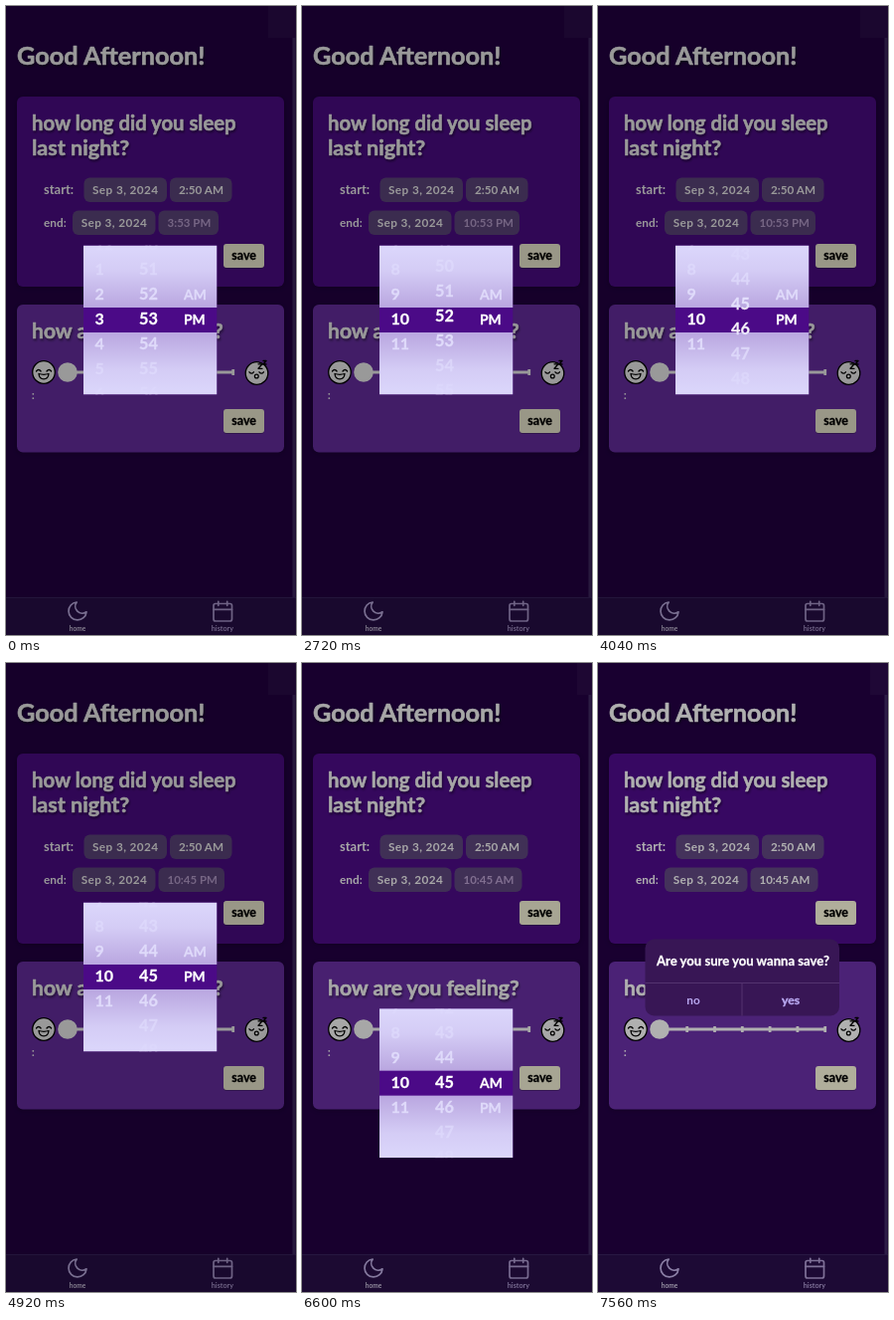
Write an HTML page that moves like this. It is 292 px wide and 632 px high and loops after 8 s.

```html
<!DOCTYPE html>
<html lang="en">
<head>
<meta charset="utf-8">
<title>Sleep log</title>
<style>
html, body { margin: 0; width: 100%; height: 100%; overflow: hidden; background: #240046; }
svg { display: block; width: 292px; height: 632px; }
text { font-family: Lato, "Open Sans", sans-serif; font-weight: 700; fill: #fff; }
.head { stroke: #fff; stroke-width: .6; stroke-linejoin: round; filter: drop-shadow(1px 2px 1px rgba(0,0,0,.45)); }
.date { font-size: 11.8px; letter-spacing: .4px; }
.ink { fill: #000; stroke: #000; stroke-width: .3; }
.wheel text { stroke: #fff; stroke-width: .3; stroke-linejoin: round; }
.line { fill: none; stroke-linecap: round; stroke-linejoin: round; }
.pill { fill: #624983; }
.card { filter: drop-shadow(0 1px 2px rgba(0,0,0,.25)); }
.choice { fill: #b9a8f0; }
</style>
</head>
<body>
<svg viewBox="0 0 292 632" xmlns="http://www.w3.org/2000/svg">
  <defs>
    <linearGradient id="fadeTop" x1="0" y1="0" x2="0" y2="1">
      <stop offset="0" stop-color="#e0ddff" stop-opacity=".97"/>
      <stop offset=".4" stop-color="#e0ddff" stop-opacity=".92"/>
      <stop offset="1" stop-color="#e0ddff" stop-opacity=".74"/>
    </linearGradient>
    <linearGradient id="fadeBottom" x1="0" y1="1" x2="0" y2="0" href="#fadeTop"/>
    <clipPath id="window"><rect x="78" y="240.5" width="134.5" height="150"/></clipPath>
  </defs>

  <rect width="292" height="632" fill="#240046"/>
  <rect id="corner" y="0" width="30" height="32" fill="#fff" opacity=".045"/>
  <rect x="288.5" y="32" width="3" height="562" fill="#432a66"/>

  <text class="head" x="11" y="59" font-size="25.3">Good Afternoon!</text>

  <rect class="card" x="11" y="91" width="269" height="191" rx="6" fill="#500c8e"/>
  <text class="head" x="26" y="125" font-size="20.3">how long did you sleep</text>
  <text class="head" x="26" y="150" font-size="21.6">last night?</text>
  <text x="38" y="188.5" font-size="13">start:</text>
  <rect class="pill" x="78.5" y="172.5" width="83.5" height="24.5" rx="6"/>
  <text class="date" x="87" y="188.8">Sep 3, 2024</text>
  <rect class="pill" x="165" y="172.5" width="62.5" height="24.5" rx="6"/>
  <text x="174" y="188.8" font-size="11.7">2:50 AM</text>
  <text x="38" y="221.5" font-size="11.8">end:</text>
  <rect class="pill" x="67" y="205.5" width="83.5" height="24.5" rx="6"/>
  <text class="date" x="75.7" y="221.8">Sep 3, 2024</text>
  <rect class="pill" id="endPill" x="153.5" y="205.5" height="24.5" rx="6"/>
  <text id="endTime" x="162.5" y="221.8" font-size="11.5"></text>

  <rect class="card" x="11" y="300" width="269" height="148.5" rx="6" fill="#6d31ab"/>
  <text class="head" x="26" y="334" font-size="21.1">how are you feeling?</text>
  <g id="slider" fill="#fff"><rect x="62" y="366.5" width="168" height="3"/></g>
  <circle cx="62" cy="368" r="9.8" fill="#fff"/>
  <g class="line" stroke="#000" stroke-width="1.3">
    <circle cx="38" cy="368" r="11.3" fill="#fff"/>
    <path d="M30.5 367q2.3-3 4.600 0M41 367q2.300-3 4.600 0"/>
    <path d="M33 369.500q5 1.600 10 0q-.500 5.300-5 5.300t-5-5.300z"/>
    <circle cx="252.500" cy="369" r="11.300" fill="#fff"/>
    <path d="M245 367.800q2.200 2.600 4.400 0M255 367.800q2.200 2.600 4.400 0"/>
    <circle cx="252.300" cy="372" r="1.900"/>
    <path d="M254 359.800h4l-4 4.500h4M259 356.500h3l-3 3.500h3"/>
  </g>
  <text x="25.800" y="395" font-size="12" font-weight="400">:</text>
  <g id="saves"></g>

  <rect y="594" width="292" height="38" fill="#2a0f4c"/>
  <rect y="594" width="292" height="1" fill="#3a2360"/>
  <g class="line" stroke="#b7a3dc" stroke-width="1.700">
    <path stroke="#c9b8f0" transform="translate(60 596)" d="M21 12.800A9 9 0 1 1 11.200 3a7 7 0 0 0 9.800 9.800z"/>
    <rect x="209" y="600.500" width="18.500" height="17.500" rx="2"/>
    <path d="M209 606.300h18.500M213.800 598.300v4M222.700 598.300v4"/>
  </g>
  <text x="63.800" y="628" font-size="6.600" style="fill:#ddd4ee">home</text>
  <text x="206.800" y="628" font-size="7.200" style="fill:#b7a3dc">history</text>

  <rect id="shade" width="292" height="632"/>

  <g id="picker">
    <g clip-path="url(#window)">
      <rect x="78" y="240.500" width="134.500" height="150" fill="#4b0a87"/>
      <g class="wheel" id="wheels"></g>
      <rect x="78" y="240.500" width="134.500" height="62.500" fill="url(#fadeTop)"/>
      <rect x="78" y="328" width="134.500" height="62.500" fill="url(#fadeBottom)"/>
    </g>
  </g>

  <g id="alert">
    <rect x="47.500" y="277.500" width="195.500" height="77" rx="9" fill="#381655"/>
    <path d="M47.500 321.500h195.500M145 321.500v33" stroke="#543370" stroke-width="1"/>
    <text x="59" y="303.500" font-size="13.100" stroke="#fff" stroke-width=".3">Are you sure you wanna save?</text>
    <text class="choice" x="89.300" y="342.500" font-size="11.800">no</text>
    <text class="choice" x="185" y="342.500" font-size="12.200" stroke="#b9a8f0" stroke-width=".4">yes</text>
  </g>
</svg>
<script>
const LOOP = 8000, STEP = 40, ROW = 25;
const $ = id => document.getElementById(id);

function add(parent, name, attrs, label) {
  const el = document.createElementNS("http://www.w3.org/2000/svg", name);
  for (const key in attrs) el.setAttribute(key, attrs[key]);
  if (label) el.textContent = label;
  return parent.appendChild(el);
}

for (let i = 1; i <= 6; i++)
  add($("slider"), "rect", { x: 60.5 + i * 27.8, y: 365, width: 2.8, height: 6, rx: .5 });

for (const y of [239, 405]) {
  add($("saves"), "rect", { x: 219, y: y + 1, width: 41, height: 24, rx: 3, opacity: .25 });
  add($("saves"), "rect", { x: 219, y, width: 41, height: 24, rx: 3, fill: "#fffbe0" });
  add($("saves"), "text", { x: 227.3, y: y + 15.5, "font-size": 12.4, class: "ink" }, "save");
}

const mod = (n, m) => ((n % m) + m) % m;
const clamp = v => Math.max(0, Math.min(1, v));

// Smooth curve through [time, value] points, flat at the ends and at turns.
function curve(keys, t) {
  const last = keys.length - 1;
  if (t <= keys[0][0]) return keys[0][1];
  if (t >= keys[last][0]) return keys[last][1];
  const slope = i => (keys[i + 1][1] - keys[i][1]) / (keys[i + 1][0] - keys[i][0]);
  const tangent = i => {
    if (i === 0 || i === last) return 0;
    const a = slope(i - 1), b = slope(i);
    return a * b <= 0 ? 0 : 2 * a * b / (a + b);
  };
  const i = keys.findIndex(k => k[0] > t) - 1;
  const [t0, v0] = keys[i], [t1, v1] = keys[i + 1];
  const d = t1 - t0, u = (t - t0) / d, w = 1 - u;
  return v0 * (1 + 2 * u) * w * w + v1 * u * u * (3 - 2 * u)
    + d * u * w * (w * tangent(i) - u * tangent(i + 1));
}

// The hour list runs 12, 1 ... 11 and stops; the minutes go round.
const wheels = [
  { x: 89.5, size: 16, label: n => n < 0 || n > 11 ? "" : n || 12,
    keys: [[240, 3], [480, 4.8], [760, 8], [1080, 9.9], [1280, 10.16], [1400, 10.16], [1520, 10]] },
  { x: 134, size: 16.3, label: n => String(mod(n, 60)).padStart(2, "0"),
    keys: [[2520, 53], [2760, 51.9], [3440, 48.1], [3920, 46], [4200, 45.3], [4280, 45.3], [4680, 45]] },
  { x: 179, size: 13.9, label: n => ["AM", "PM"][n] || "",
    keys: [[5360, 1], [5520, 0]] }
];
for (const w of wheels)
  w.rows = Array.from({ length: 9 }, () => add($("wheels"), "text", { x: w.x, "font-size": w.size }));

function turn(w, t) {
  const pos = curve(w.keys, t), mid = Math.round(pos);
  w.rows.forEach((row, i) => {
    const n = mid + i - 4;
    row.textContent = w.label(n);
    row.setAttribute("y", 320.3 + (n - pos) * ROW);
    row.setAttribute("opacity", clamp(1.05 - .25 * Math.abs(n - pos)));
  });
}

// [from, label, pill width]
const times = [[0, "3:53 PM", 60.5], [1800, "10:53 PM", 65.5], [4920, "10:45 PM", 66.5], [5760, "10:45 AM", 68]];

function draw(t) {
  wheels.forEach(w => turn(w, t));

  const [, label, width] = times.filter(e => e[0] <= t).pop();
  $("endTime").textContent = label;
  $("endTime").style.fill = t < 6760 ? "#c4a9dc" : "#fff";
  $("endPill").setAttribute("width", width);

  const leave = clamp((t - 6560) / 360), out = 1 - Math.pow(1 - leave, 2.7);
  $("picker").setAttribute("transform", `translate(0 ${391.5 * out})`);
  $("picker").style.display = out < 1 ? "" : "none";

  const x = clamp((t - 7280) / 280), show = 1 - (1 - x) * (1 - x);
  const scale = 1.15 - .15 * show;
  $("alert").setAttribute("opacity", show);
  $("alert").setAttribute("transform", `translate(145.25 316) scale(${scale}) translate(-145.25 -316)`);
  $("shade").setAttribute("opacity", .4 * Math.pow(1 - leave, 1.3) + .31 * show);

  $("corner").setAttribute("x", t < 6600 ? 264 : t < 6920 ? 277 : t < 7320 ? 267 : 274);
}

function tick(now) {
  draw(Math.floor((now % LOOP) / STEP) * STEP);
  requestAnimationFrame(tick);
}
draw(0);
requestAnimationFrame(tick);
</script>
</body>
</html>
```
